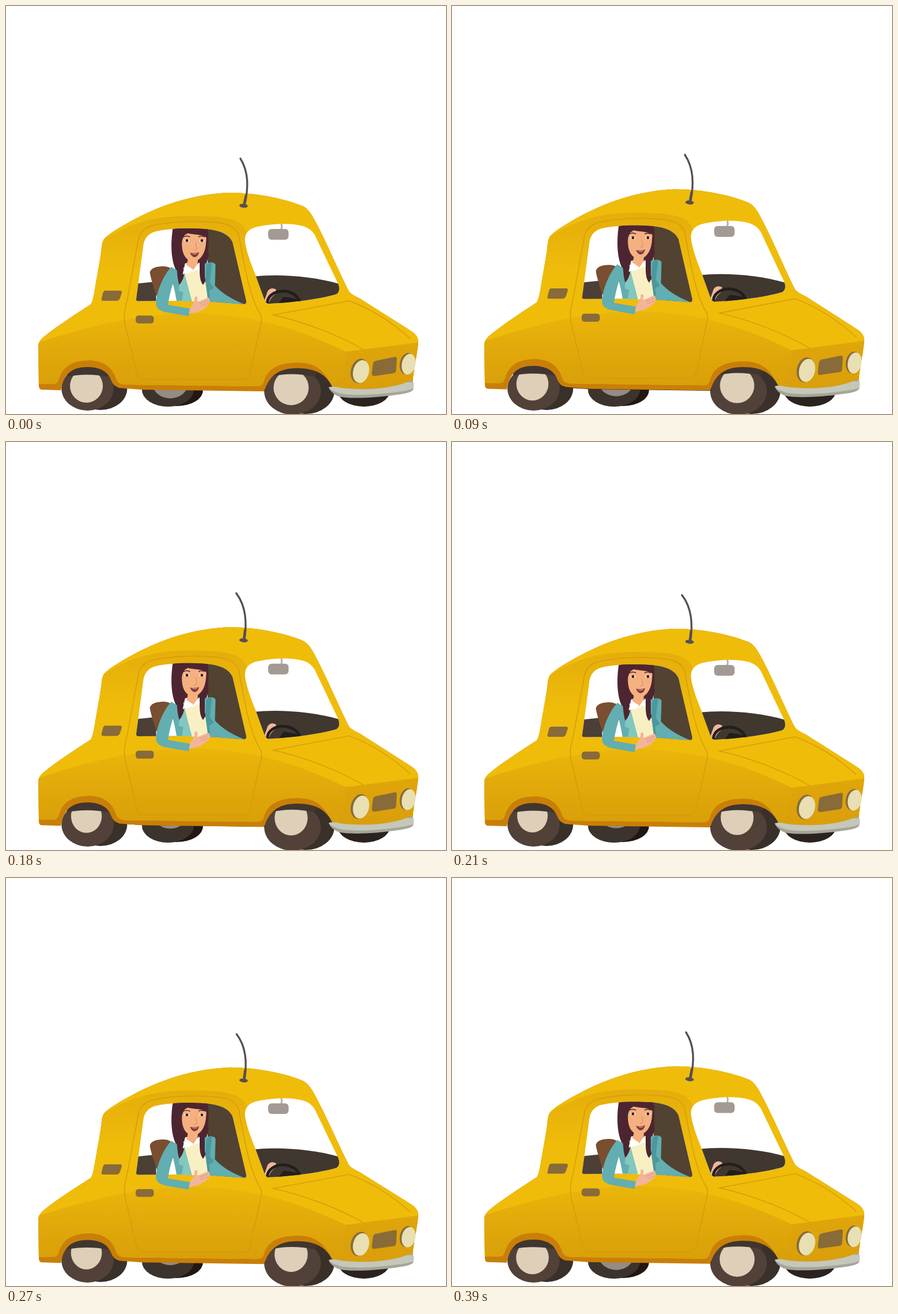
An HTML page with a canvas for the animation above (420 ms loop, 777 px wide and 721 px high).

```html
<!DOCTYPE html>
<html>
<head>
<meta charset="utf-8">
<style>
  html, body { margin: 0; height: 100%; overflow: hidden; background: #fff; }
  canvas { display: block; }
</style>
</head>
<body>
<canvas id="stage" width="777" height="721"></canvas>
<script>
const ctx = document.getElementById('stage').getContext('2d');
const LOOP = 420, STEP = 30;

const fill = (color, d) => {
  ctx.fillStyle = color;
  ctx.fill(new Path2D(d));
};
const line = (color, width, d) => {
  ctx.strokeStyle = color;
  ctx.lineWidth = width;
  ctx.stroke(new Path2D(d));
};
const oval = (color, x, y, rx, ry, turn = 0) => {
  ctx.fillStyle = color;
  ctx.beginPath();
  ctx.ellipse(x, y, rx, ry, turn, 0, 7);
  ctx.fill();
};
const box = (color, x, y, w, h, r) => {
  ctx.fillStyle = color;
  ctx.beginPath();
  ctx.roundRect(x, y, w, h, r);
  ctx.fill();
};
const clipped = (d, draw) => {
  ctx.save();
  ctx.clip(new Path2D(d));
  draw();
  ctx.restore();
};
const shifted = (dy, draw) => {
  ctx.save();
  ctx.translate(0, dy);
  draw();
  ctx.restore();
};
const vertical = (y0, y1, ...colors) => {
  const g = ctx.createLinearGradient(0, y0, 0, y1);
  colors.forEach((c, i) => g.addColorStop(i / (colors.length - 1), c));
  return g;
};

const YELLOW = '#efbc0a', TRIM = '#c97f07', SEAM = '#d59b08', BROWN = '#886b39';
const SKIN = '#f5b07f', PALM = '#f2b59a', HAIR = '#4d2530', TEAL = '#62aeb0';

const outline = `M58 670L57 601Q57 594 64 587C84 570 113 551 150 527Q154 520 157 500
  C163 465 168 440 169 425Q170 417 173 412Q180 404 200 392C260 356 320 334 390 330
  C440 329 495 341 525 354Q533 358 541 371C564 412 588 470 606 505Q610 510 625 517L715 574
  Q728 582 728 593C727 612 720 640 718 665L716 672Q650 688 577 674`;
const shell = outline + `C566 652 548 640 514 640C480 640 464 655 456 681L240 678L200 675
  Q190 672 186 662C180 645 165 638 143 638C112 638 101 655 97 679L63 678Q58 678 58 670Z`;
const paint = outline + `C562 642 545 630 515 630C475 630 460 645 455 664Q453 672 443 672
  L210 669Q198 668 195 660C188 636 170 627 148 626C115 626 100 638 93 660Q91 668 84 668L58 668Z`;
const sideWindow = `M230 517L243 420Q247 404 262 399C285 393 320 392 350 394Q390 396 400 417
  L424 520Q426 527 420 527L368 523L300 521L233 521.5Q229 521 230 517Z`;
const windshield = `M422 415Q421 397 440 391C465 385 500 382 525 389Q538 393 545 404L587 492
  Q591 504 584 509C555 518 505 524 466 526Q459 527 456 518L440 474Q424 435 422 415Z`;

function wheels(bob) {
  oval('#211713', 302, 679, 46, 28);
  oval('#3c332d', 286, 678, 46, 30);
  oval('#948b84', 290, 660 + 5.5 * bob, 32, 28);
  oval('#2b231f', 632, 680, 46, 28);

  oval('#3a302a', 167, 676, 47, 38);
  oval('#524139', 144, 676, 46, 39);
  oval('#decfb8', 142, 666 + 5.5 * bob, 28 + bob, 29.5);

  oval('#3a302a', 529, 680, 51, 41);
  oval('#524139', 506, 681, 50, 41);
  oval('#decfb8', 503.5, 669 + 5.5 * bob, 30 + bob, 31);
}

function passenger(lag) {
  shifted(lag, () => {
    fill('#4b3f36', 'M226 491L265 487V530H226Z');
    fill('#7a4e31', 'M254 471Q256 461 275 460Q292 459 294 470L302 530H272Q256 485 254 471Z');
  });
  fill('#524231', 'M356 390H430V530H356Z');
  fill('#fff', 'M294 486L303 524H285Z');
  fill(HAIR, `M295 390L356 392C359 415 358 435 352 452C349 468 356 480 349 493Q342 488 340 475
    L338 450L316 455C318 472 314 485 306 494Q300 485 302 470C291 452 290 420 295 390Z`);
  fill('#f8f0c4', 'M313 462L330 470L345 460L355 500L358 524H326Z');
  fill(SKIN, 'M321 440H340L338 456L330 468L317 458Q322 455 321 440Z');
  fill('#fff', 'M316 456L331 466L325 471L312 474ZM341 453L345 462L340 468L334 462Z');
  fill(SKIN, 'M311 408C309 432 313 449 331 452C345 449 354 435 354 408L326 398Z');
  fill(HAIR, `M309 424C311 412 314 405 319 401C332 405 350 403 354 410L357 390H298L300 440Z
    M342 449C350 444 353 430 354 410L358 440L350 470L353 485L348 493Q342 486 342 470Z`);
  line('#3b1f24', 1.5, 'M313 408Q319 405 325 408M340 408Q346 405 351 408');
  oval('#fff', 319.5, 414.5, 4.5, 2.2);
  oval('#fff', 346, 414.5, 4.5, 2.2);
  oval('#3b1f1e', 319.5, 414.5, 2.6, 2.4);
  oval('#3b1f1e', 346, 414.5, 2.6, 2.4);
  line('#dd8f69', 1.2, 'M335 418L337 430L332 432');
  fill('#843b38', 'M325 436Q333 438 341 435Q339 444 332 444Q327 442 325 436Z');
  fill('#fff', 'M327 437Q333 439 339 436.5Q334 440.5 327 437Z');
  fill(TEAL, `M291 461L302 468Q303 484 306 493Q314 484 315 472L329 525H302L295 488Z
    M351 455Q366 450 370 457L369 494Q388 515 424 528H357Q360 500 351 480Z`);
  fill('#82c8be', 'M306 493Q314 484 315 472L328 523H310L313 506L305 503Z');
  fill('#4c989c', 'M354 458Q359 452 364 453L360 488L367 498L359 503L361 523H357L352 486Z');
}

function arm() {
  fill(TEAL, `M292 461C279 474 265 505 265 526Q265 537 282 541L322 548L326 535L286 528
    Q289 508 295 490L302 467Z`);
  fill(PALM, `M325 534C331 525 334 520 333 515Q336 511 338 515Q339 520 336 524L355 516
    Q361 515 359 519Q363 521 358 525Q360 529 354 530Q352 535 347 536C340 542 332 541 323 544Z`);
  line('#d98f78', 0.9, 'M342 526L358 520M344 530L357 525');
}

function driverSide(lag) {
  shifted(lag, () => fill('#40372f', 'M436 478C480 473 545 477 595 493V535H436Z'));
  fill(PALM, 'M455 524L462 504Q468 496 477 501L476 509Q468 514 464 524Z');
  ctx.strokeStyle = '#211f1d';
  ctx.lineWidth = 5;
  ctx.beginPath();
  ctx.ellipse(490.5, 526, 29, 22, 0.1, 0, 7);
  ctx.stroke();
  fill('#211f1d', 'M478 530L490 514L505 516L519 519V530Z');
  line('#b7afaa', 3, 'M485 382Q489 390 485 397');
  box('#a49a94', 463, 394, 36, 19, 6);
}

function body(lag) {
  fill('#40362f', 'M105 630H186L180 655Q142 648 108 655ZM462 632H560L545 655Q503 646 468 655Z');
  fill(TRIM, shell);
  fill(YELLOW, paint);
  clipped(paint, () => {
    fill(vertical(371, 470, '#e5ad0a', YELLOW), `M165 417C215 385 260 371 320 371
      C375 371 418 373 425 400L422 420L460 545H140Z`);
    fill(vertical(543, 675, '#ebb60a', '#e1a90a', '#d99f0a'), `M50 597C150 565 230 544 330 543
      C440 545 520 572 600 611L735 593V700H50Z`);
    fill('#d99e0a66', 'M600 611L735 595V700H575Q600 650 600 611Z');
  });

  line(SEAM, 1.4, `M209 545Q211 530 214 520L234 412Q237 396 255 389C290 380 340 379 375 383
    Q404 386 411 405C420 455 430 512 447 541Q453 550 451 558L431 650Q428 660 420 660
    L240 660Q234 660 231 650L215 582Q208 560 209 545Z`);
  line(SEAM, 1.4, 'M714 588Q665 543 606 521L472 546C530 559 590 583 631 607');

  fill('#fff', sideWindow);
  clipped(sideWindow, () => passenger(lag));
  arm();
  fill('#fff', windshield);
  clipped(windshield, () => driverSide(lag));

  fill(BROWN, `M176 503H201Q206 503 204 508L201 517Q199 521 195 521H172Q167 521 169 516
    L171 508Q172 503 176 503Z`);
  box(BROWN, 229, 547, 32, 14, 5);

  fill(BROWN, `M653 627L687 620Q691 620 690 625L689 644Q688 649 684 649L650 654
    Q646 654 646 649L648 632Q649 628 653 627Z`);
  oval(BROWN, 624.5, 645, 15.5, 22, 0.25);
  oval('#e8dfb3', 627, 646, 14, 20.5, 0.25);
  oval(BROWN, 708, 632, 12.5, 19, 0.2);
  oval('#e8dfb3', 711, 633, 12, 18.5, 0.2);

  const bumper = `M570 674Q578 671 592 675C650 681 690 673 715 662Q722 662 719 678
    Q716 684 690 687C650 693 600 695 585 689Q573 683 570 674Z`;
  fill('#a5a599', bumper);
  clipped(bumper, () => fill('#c5c7b9', `M565 665H730V671Q715 680 690 682
    C650 688 605 689 588 684Q575 680 565 672Z`));
}

function antenna(bob) {
  oval('#565053', 419.5, 353, 7.5, 3.5, 0.1);
  ctx.save();
  ctx.translate(420, 353);
  ctx.rotate(0.047 * bob);
  ctx.lineCap = 'round';
  line('#565053', 3.4, 'M1 0C7 -32 6 -60 -10 -83');
  line('#565053', 4.5, 'M0 0L3 -18');
  ctx.restore();
}

function frame(now) {
  const t = Math.floor(now % LOOP / STEP) * STEP;
  const phase = t / LOOP * 2 * Math.PI;
  const bob = Math.cos(phase - 0.1);
  const sway = Math.sin(phase);

  ctx.clearRect(0, 0, 777, 721);
  wheels(bob);
  line('#2a1d12', 2, 'M195 673L240 676L458 679');

  // the body stretches upward from a point below the road; seat and dashboard follow less
  ctx.save();
  ctx.translate(0, 800);
  ctx.scale(1, 1 + 0.0134 * sway);
  ctx.translate(0, -800);
  body(2 * sway);
  antenna(bob);
  ctx.restore();
  requestAnimationFrame(frame);
}
requestAnimationFrame(frame);
</script>
</body>
</html>
```
